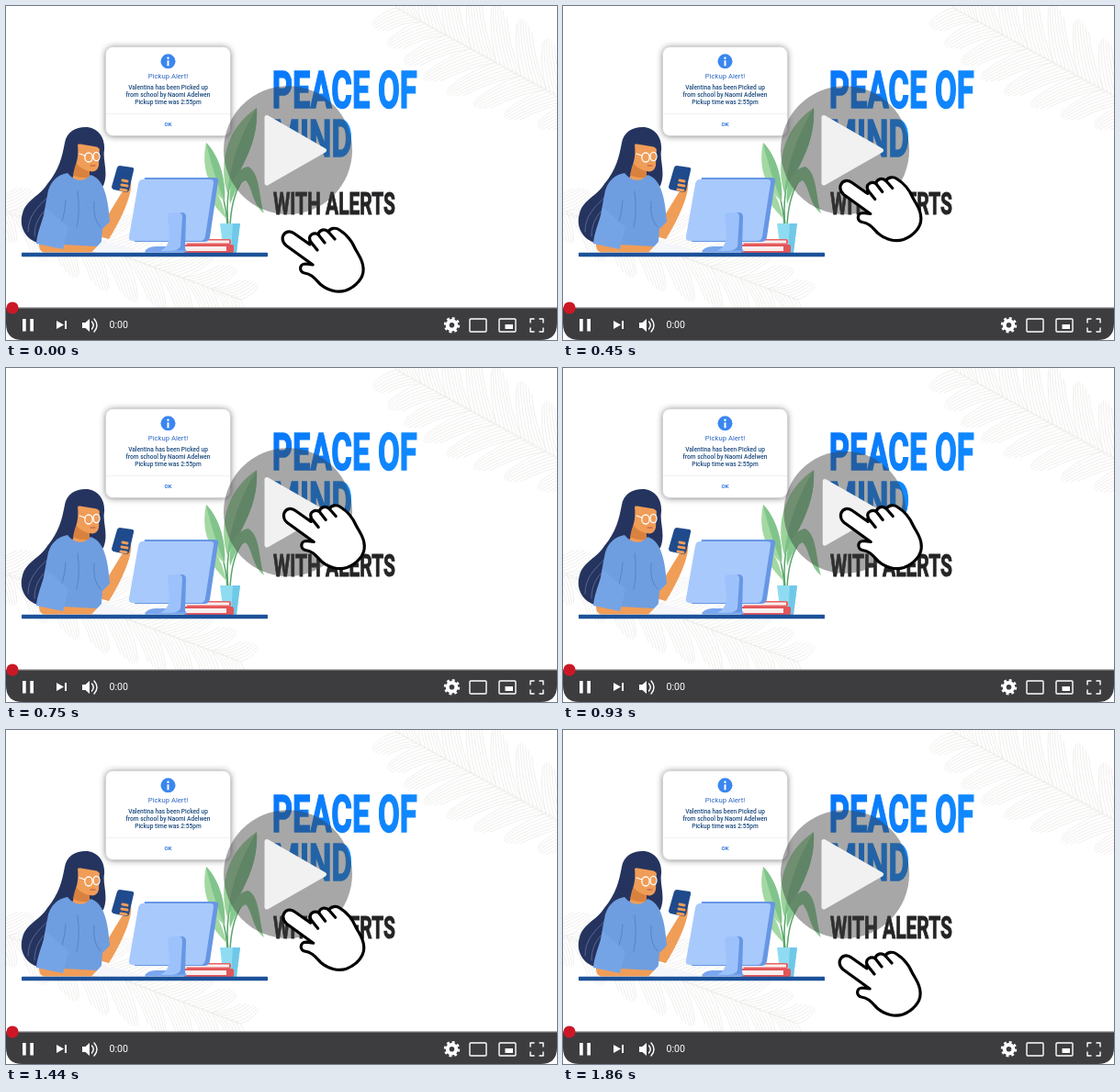
Recreate the animation shown at these times as an HTML page. Size 600 by 364 pixels, loop 2790 ms.

```html
<!DOCTYPE html>
<html lang="en">
<head>
<meta charset="utf-8">
<title>Peace of mind with alerts</title>
<style>
  html, body { margin: 0; width: 100%; height: 100%; overflow: hidden; background: #fff; }
  svg { display: block; width: 600px; height: 364px; }
  text { font-family: Roboto, "Liberation Sans", sans-serif; }
  .head { font-weight: 700; stroke-width: 1.6; }
  .alert { font-family: Inter, Roboto, sans-serif; text-anchor: middle; }
  .frond { fill: none; stroke: #efeeeb; stroke-width: .9; }
  .line { fill: none; stroke-linecap: round; stroke-linejoin: round; }
</style>
</head>
<body>
<svg viewBox="0 0 600 364">
  <defs>
    <linearGradient id="blue"><stop stop-color="#0878fa"/><stop offset="1" stop-color="#1089ff"/></linearGradient>
    <filter id="shadow" x="-20%" y="-20%" width="140%" height="150%">
      <feDropShadow dx="0" dy=".5" stdDeviation="3.2" flood-color="#333" flood-opacity=".6"/>
    </filter>
  </defs>

  <rect width="600" height="364" fill="#fff"/>
  <g id="fronds" class="frond"></g>

  <!-- plant -->
  <g class="line" stroke="#5aa56c" stroke-width="1.5">
    <path d="M242 240C239 212 243 195 250 165M241 240C240 212 231 190 220 160M244 240C245 218 249 198 262 184"/>
  </g>
  <path d="M241 204C231 172 240 133 273 111C275 146 260 171 241 204Z" fill="#9bd39b"/>
  <path d="M241 204C244 172 255 141 273 111C275 146 260 171 241 204Z" fill="#7cc088"/>
  <path d="M238 213C221 198 212 176 218 149C231 162 240 188 238 213Z" fill="#a3d8a2"/>
  <path d="M238 213C231 196 223 172 218 149C231 162 240 188 238 213Z" fill="#80c48c"/>
  <path d="M244 216C241 193 252 176 264 175C277 183 275 207 281 226C268 216 269 199 261 190C253 193 249 203 244 216Z" fill="#86c98f"/>
  <path d="M240 232C236 214 229 197 216 189C216 204 224 215 240 232Z" fill="#a3d8a2"/>
  <path d="M233 237H255L251 269H237Z" fill="#8fdcf2"/>
  <path d="M247 237H255L251 269H245Z" fill="#70c8e8"/>

  <!-- books -->
  <rect x="196" y="254" width="49" height="6" rx="2" fill="#e9605f"/>
  <rect x="196" y="255.500" width="47" height="3" fill="#f8f1f2"/>
  <rect x="193" y="260" width="55" height="9" rx="2" fill="#e2565a"/>
  <rect x="194" y="262" width="46" height="5" fill="#f8eeee"/>

  <!-- monitor -->
  <path d="M151 187H227Q232 187 231 191L222 252Q221 257 216 257H140Z" fill="#6797e4"/>
  <path d="M149 189H222Q227 189 226 193L217 251Q216 256 212 256H138Q133 256 134 251L144 194Q145 189 149 189Z" fill="#a8c9fc"/>
  <path d="M151 268.500Q153 262 163 262H190Q196 263 197 268.500Z" fill="#79a6ee"/>
  <path d="M181 225H191Q196 225 196 230L195 266H181Z" fill="#6797e4"/>
  <path d="M181 225H188Q192 225 192 230L190 262Q188 267 177 267H168Q178 262 178 250L176 230Q176 225 181 225Z" fill="#9dc2fb"/>

  <!-- woman -->
  <path d="M64 149C66 136 78 131 89 132C102 134 108 145 107 157C105 168 112 181 106 196L89 203C75 214 54 236 43 260C23 258 13 242 18 226C22 211 37 207 45 194C58 178 61 165 64 149Z" fill="#25345f"/>
  <path class="line" stroke="#7787b5" stroke-width=".6" d="M24 246C24 229 34 219 47 207M31 251C31 235 38 226 50 215"/>
  <path d="M78 150L102 154L101 174Q99 182 91 180V193L69 193Q76 183 76 171Z" fill="#f09d58"/>
  <path d="M76 171Q83 179 91 180V187Q80 188 73 184Z" fill="#d9823f"/>
  <path d="M78 151C84 148 94 147 103 157C106 146 101 137 89 137C75 137 69 147 69 158C69 171 63 181 57 190C75 184 80 169 78 151Z" fill="#25345f"/>
  <g class="line" stroke="#fff" stroke-width="1.300">
    <ellipse cx="90" cy="165" rx="4.200" ry="5"/>
    <ellipse cx="98.500" cy="164" rx="3.500" ry="4.700"/>
    <path d="M80 161L86 163"/>
  </g>
  <path class="line" stroke="#b85142" stroke-width="1" d="M92 174L97 174"/>
  <path d="M125 205C129 199 129 191 133 188C137 187 137 196 135 204C132 218 121 240 112 254L98 250C106 236 117 218 125 205Z" fill="#f09d58"/>
  <path d="M67 182C75 192 86 192 92 184C106 188 111 207 113 235L105 243L103 268H43L36 259C40 239 42 219 46 201Q51 185 67 182Z" fill="#6e9ee0"/>
  <path class="line" stroke="#5583c8" stroke-width="1" d="M65 212Q64 234 54 249M96 213Q94 232 103 241M78 202Q81 225 77 241"/>
  <path d="M36 257Q35 267 41 268.500H96Q108 268 116 263Q108 259 99 262L62 260Z" fill="#f09d58"/>
  <path d="M43 219C41 233 34 245 33 259L62 265L68 241Z" fill="#75a4e6"/>
  <path d="M93 268.500L104 257L126 261L151 268.500Z" fill="#f4f6fb"/>
  <path d="M121 176Q122 174 124 174L138 176Q140 177 139 179L134 201Q133 203 131 203L117 200Q115 199 115 197Z" fill="#1f4a8c"/>
  <path class="line" stroke="#f09d58" stroke-width="3" d="M132 191L127 190M132 196L126 195M131 201L125 200"/>
  <rect x="17" y="268.700" width="268" height="4.600" rx=".7" fill="#1c5199"/>

  <!-- alert -->
  <rect x="108.500" y="44.500" width="136" height="97" rx="8" fill="#fff" stroke="#c2c4c8" stroke-width=".6" filter="url(#shadow)"/>
  <path d="M109 117.500H244" stroke="#f0f0f0"/>
  <circle cx="176.500" cy="60.300" r="8" fill="#3a86f0"/>
  <circle cx="176.500" cy="56.800" r="1.200" fill="#fff"/>
  <rect x="175.500" y="59.300" width="2" height="6" fill="#fff"/>
  <g class="alert" fill="#1b4a7e" font-size="6.600" font-weight="500">
    <text x="176.500" y="79.300" font-size="7.700" font-weight="400" fill="#2f68c4">Pickup Alert!</text>
    <text x="176.500" y="91.400">Valentina has been Picked up</text>
    <text x="176.500" y="99.200">from school by Naomi Adelwen</text>
    <text x="176.500" y="107">Pickup time was 2:55pm</text>
    <text x="176.500" y="130.700" font-size="6" font-weight="600" fill="#2c73dc">OK</text>
  </g>

  <!-- headline in one condensed face -->
  <g class="head" transform="scale(.617 1)">
    <g font-size="56" fill="url(#blue)" stroke="url(#blue)">
      <text x="469.500" y="110.700">PEACE OF</text>
      <text x="469.500" y="163.700">MIND</text>
    </g>
    <text x="471.500" y="227" font-size="34" fill="#242426" stroke="#242426" stroke-width="1">WITH ALERTS</text>
  </g>

  <g id="play">
    <circle cx="307" cy="157.200" r="70" fill="#3c3c3c" fill-opacity=".45"/>
    <path d="M284 121.500L346.500 157.300L284 193Z" fill="#f1f1f1" stroke="#f1f1f1" stroke-width="5" stroke-linejoin="round"/>
  </g>

  <!-- controls -->
  <path d="M0 329H600V346Q600 364 582 364H18Q0 364 0 346Z" fill="#3d3d40"/>
  <rect y="328.500" width="600" height="1.500" fill="#69696c"/>
  <circle cx="7" cy="329" r="6.600" fill="#cc1826"/>
  <g fill="#fff">
    <path d="M18 341h3.700v13.500h-3.700zM26.300 341h3.700v13.500h-3.700zM55 343L63 347.500L55 352ZM64 343h2v9h-2zM83 345h3.500l4.500-4v14l-4.500-4H83z"/>
    <text x="112.500" y="351.300" font-size="10.600">0:00</text>
    <rect x="543.500" y="347" width="8.500" height="5"/>
  </g>
  <g class="line" stroke="#fff" stroke-width="1.400">
    <path d="M93.500 344Q97 348 93.500 352M96 341Q102 348 96 355"/>
    <rect x="505" y="341" width="18" height="14" rx="1"/>
    <rect x="537" y="341" width="18" height="14" rx="1"/>
    <path d="M571 345V341H575M581 341H585V345M585 351V355H581M575 355H571V351"/>
  </g>
  <circle cx="485.500" cy="347.700" r="4.800" fill="none" stroke="#fff" stroke-width="4"/>
  <circle cx="485.500" cy="347.700" r="7.400" fill="none" stroke="#fff" stroke-width="2.600" stroke-dasharray="2.900 2.912"/>

  <g id="hand" class="line" stroke="#000" stroke-width="3.200">
    <path fill="#fff" d="M331 260L314 248C309 244 303.500 246 301.500 251C300.500 255 301.500 258 305 261L334 282L326 281C319 281 319 290 325 291C333 292 337 298 342 303C350 310 361 313 370 310C381 306 390 296 389 286C389 277 384 272 380 264C377 257 371 249 363 244C359 241 353 242 351 246C347 242 341 244 340 249C335 246 329 250 331 255Z"/>
    <path d="M331 256L339 266M340 249L347 258M351 246L358 254"/>
  </g>
</svg>
<script>
const STEP = 30, LOOP = 2790, TOP = 750, LEAVE = 1080, REST = 1860;
const byId = id => document.getElementById(id);
const mix = (a, b, k) => a + (b - a) * k;
const hand = byId("hand"), play = byId("play");

// Banana leaf: broad striped strips on both sides of a rib.
function frond(x0, y0, x1, y1, count, size, spread) {
  const heading = Math.atan2(y1 - y0, x1 - x0);
  let d = `M${x0} ${y0}L${x1} ${y1}M${x0} ${y0 + 3}L${x1} ${y1}`;
  for (let i = 0; i < count; i++) {
    const at = k => [mix(x0, x1, (i + k) / count), mix(y0, y1, (i + k) / count)];
    const reach = size * (.35 + .65 * Math.sin(Math.PI * (i + 1) / (count + 1)));
    const [px, py] = at(.5);
    for (const side of [-1, 1]) {
      const a = heading + side * spread;
      for (let j = 0; j <= 6; j++) {
        const [bx, by] = at(j / 6);
        const length = reach * (1 - .015 * (j - 3) ** 2);
        const tx = mix(px, bx, .6) + length * Math.cos(a);
        const ty = mix(py, by, .6) + length * Math.sin(a);
        const cx = mix(bx, tx, .5) - side * 5 * Math.cos(a + 1.57);
        const cy = mix(by, ty, .5) - side * 5 * Math.sin(a + 1.57);
        d += `M${bx} ${by}Q${cx} ${cy} ${tx} ${ty}`;
      }
    }
  }
  const path = document.createElementNS("http://www.w3.org/2000/svg", "path");
  path.setAttribute("d", d);
  byId("fronds").append(path);
}
frond(670, 135, 425, 2, 9, 72, .9);
frond(-60, 200, 255, 320, 10, 62, .8);

function draw(t) {
  const lift = t < TOP ? t / TOP
    : t <= LEAVE ? 1
    : Math.max(0, (REST - t) / (REST - LEAVE));
  hand.setAttribute("transform", `translate(${1.2 * lift} ${-92.5 * lift})`);

  const pressed = t > TOP && t < LEAVE;
  const press = pressed ? Math.sin(Math.PI * (t - TOP) / (LEAVE - TOP)) : 0;
  play.setAttribute("transform", `translate(307 157.2) scale(${1 - .05 * press}) translate(-307 -157.2)`);
}

const start = performance.now();
function tick() {
  const t = (performance.now() - start) % LOOP;
  draw(Math.floor(t / STEP) * STEP);
  requestAnimationFrame(tick);
}
tick();
</script>
</body>
</html>
```
